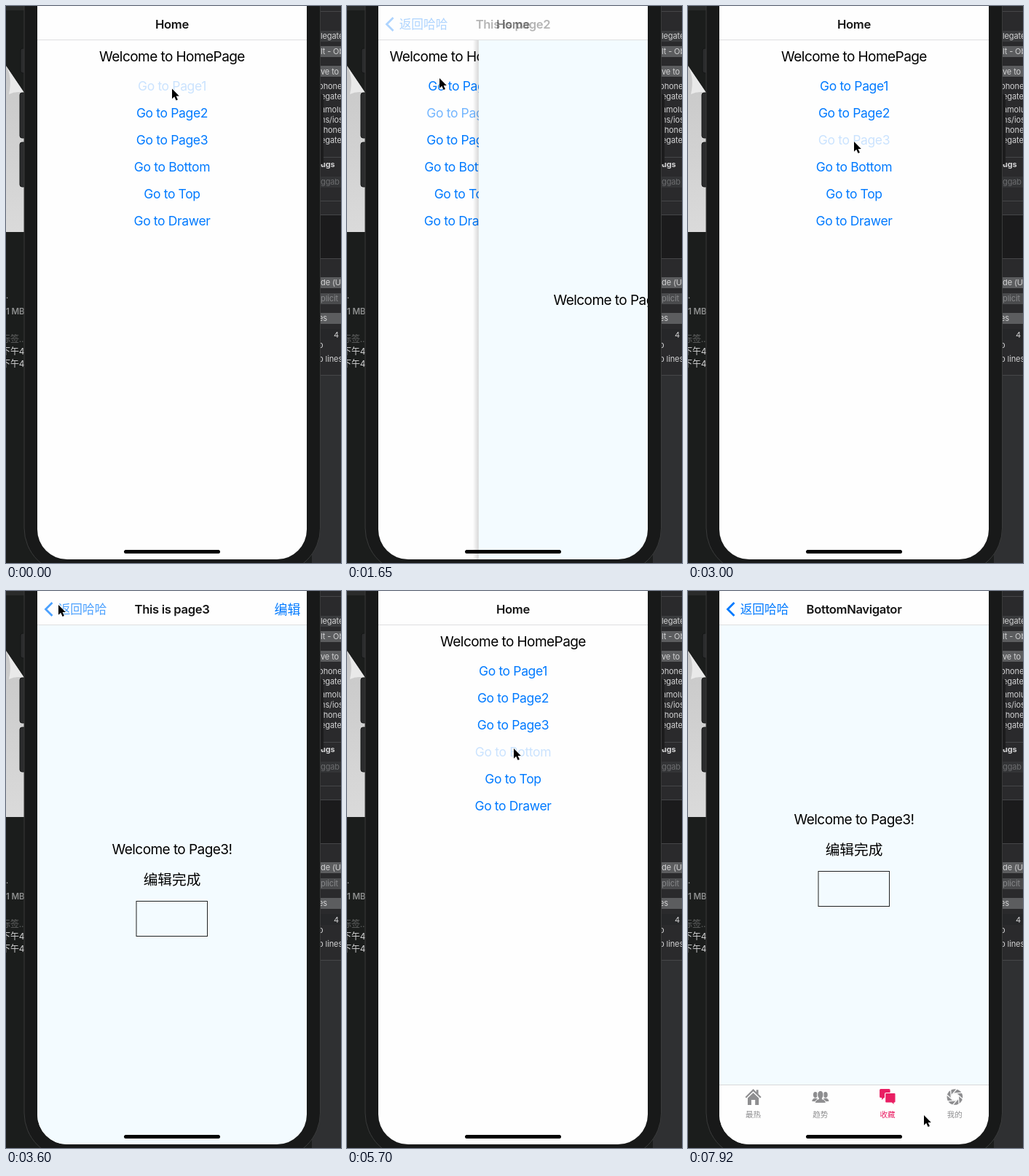
An HTML page that plays this animation: 460x764 px, repeating every 8000 ms.

```html
<!DOCTYPE html>
<html lang="en">
<head>
<meta charset="utf-8">
<title>Stack navigation demo</title>
<style>
html, body { margin: 0; width: 100%; height: 100%; overflow: hidden; background: #1b1d1c; }
svg { display: block; }
text { font-family: Inter, "Noto Sans CJK SC", "Noto Sans CJK", sans-serif; text-anchor: middle; fill: #000; }
.latin { letter-spacing: -.03em; }
.link { fill: #007aff; letter-spacing: -.02em; }
.title { font-weight: 600; fill: #151515; letter-spacing: -.02em; }
.blue { fill: #007aff; }
.side { text-anchor: start; fill: #d2d2d3; letter-spacing: -.01em; }
.tab { color: #8e8e90; }
.tab.on { color: #e91e63; }
.tab text, .tab .ink { fill: currentColor; }
</style>
</head>
<body>
<svg id="stage" width="460" height="764" viewBox="0 0 460 764"></svg>
<script>
const LOOP = 8000, MID = 228, LEFT = 43, WIDTH = 370;

const text = (x, y, size, str, cls = '', extra = '') =>
  `<text x="${x}" y="${y}" font-size="${size}" class="${cls}" ${extra}>${str}</text>`;
const rect = (x, y, w, h, fill, extra = '') =>
  `<rect x="${x}" y="${y}" width="${w}" height="${h}" fill="${fill}" ${extra}/>`;
const heading = (y, str) => text(MID, y, 19.05, str, 'latin');
const link = (y, str, extra) => text(MID, y, 17.5, str, 'link', extra);

// Desktop behind the phone
function desktop() {
  const field = (y, fill) => rect(420, y, 50, 15, fill, 'rx="3"');
  const rule = y => rect(420, y, 40, 1, '#454648');
  const label = (y, str, x = 432, fill = '#d2d2d3', weight = 400) =>
    text(x, y, 11, str, 'side', `style="fill:${fill};font-weight:${weight}"`);
  const paths = ['phone', 'egate', 'amolu', 'ns/ios', 'phone', 'egate'];
  const rows = [114, 128, 146, 160, 174, 188];
  return rect(0, 0, 460, 764, '#1b1d1c') + rect(0, 0, 25, 6, '#2a2b2b')
    + '<path d="M0 82L25 119V310H0Z" fill="url(#paper)"/>'
    + '<path d="M0 82Q9 98 4 121Q14 116 25 119Z" fill="#e9e9e9"/>'
    + text(0, 401, 11, '.', 'side') + text(0, 423, 11.5, '1 MB', 'side', 'style="fill:#8d8e8e;font-weight:600"')
    + text(-6, 461, 12, '标签...', 'side', 'style="fill:#626363"')
    + text(-6, 478, 12, '下午4', 'side') + text(-6, 495, 12, '下午4', 'side')
    + rect(420, 0, 40, 764, '#2a2a2c') + rect(420, 507, 40, 257, '#2f3032') + rule(7)
    + field(34, '#3a3b3d') + field(55, '#5c5d5f') + field(82, '#5c5d5f')
    + label(45, 'legate') + label(66, 'lt - Obj') + label(94, 've to G')
    + paths.map((str, i) => label(rows[i], str, i % 4 ? 432 : 429)).join('')
    + rule(207) + label(221, 'ugs', 432, '#d2d2d3', 700)
    + field(234, '#333436') + label(245, 'ggab', 432, '#6c6d6f') + rule(267)
    + rect(420, 286, 40, 61, '#1b1b1c') + rule(286) + rule(346)
    + field(372, '#5c5d5f') + field(394, '#4a4b4d') + field(421, '#5c5d5f') + field(443, '#262729')
    + label(383, 'de (UT') + label(405, 'plicit', 432, '#87888a') + label(432, 'es', 429)
    + label(455, '4', 450) + label(469, 'o', 429) + label(488, 'p lines', 429) + rule(506);
}

function phone() {
  const button = (x, y, w, h) => rect(x, y, w, h, '#2b2c2d', 'rx="3" stroke="#151616"');
  return button(20, 58, 10, 34) + button(19, 119, 10, 62) + button(19, 187, 10, 61)
    + rect(425, 121, 11, 96, '#1c1c1d', 'rx="2"')
    + rect(25, -100, 406.5, 878, '#181919', 'rx="62" stroke="#3a3b3b"');
}

// Page contents
const links = ['Page1', 'Page2', 'Page3', 'Bottom', 'Top', 'Drawer'];
const white = rect(LEFT, 47, WIDTH, 715, '#fefefe');
const azure = rect(LEFT, 47, WIDTH, 715, '#f3fbff');
const home = white + heading(76, 'Welcome to HomePage')
  + links.map((name, i) => link(115.5 + 37 * i, 'Go to ' + name, `id="link${i}"`)).join('');
const page1 = white + heading(76, 'Welcome to page1!') + link(115.5, 'Go Back')
  + text(MID, 152.5, 17.7, '跳转页面4', 'blue');
const page2 = azure + heading(410, 'Welcome to Page2!');
const page3 = azure + heading(361, 'Welcome to Page3!') + text(MID, 402.5, 19.7, '编辑完成')
  + rect(179, 425.5, 97.5, 48, 'none', 'stroke="#222"');

const blades = Array.from({ length: 8 }, (_, i) =>
  `<path d="M-4.6 -2.4L3.4 -11.6" stroke="#fefefe" stroke-width="1.3" transform="rotate(${45 * i})"/>`).join('');
const icons = [
  '<path class="ink" d="M0 -11L4.2 -6.8V-9.8H7V-4L11 0L9.6 1.5L0 -7.8L-9.6 1.5L-11 0Z"/>'
    + '<path class="ink" d="M0 -5.8L7.6 1.6V11H2.6V4H-2.6V11H-7.6V1.6Z"/>',
  [-7, 7].map(x => `<ellipse class="ink" cx="${x}" cy="-3" rx="2.9" ry="4"/>
    <path class="ink" d="M${x - 4.5} 6Q${x - 4.5} 2.5 ${x} 1.6Q${x + 4.5} 2.5 ${x + 4.5} 6Z"/>`).join('')
    + '<g stroke="#fefefe"><ellipse class="ink" cy="-3" rx="4.2" ry="5.6"/><path class="ink" d="M-7.4 8.4Q-7.4 4 -2 2.6H2Q7.4 4 7.4 8.4Z"/></g>'
    + '<path class="ink" d="M-2 0H2V4H-2Z"/>',
  '<path class="ink" d="M-9.5 -11H2Q3.5 -11 3.5 -9.5V1H-5L-8 4V1H-9.5Q-11 1 -11 -0.5V-9.5Q-11 -11 -9.5 -11Z"/>'
    + '<path class="ink" stroke="#fefefe" stroke-width="1.2" d="M-2 -5.5H9.5Q11 -5.5 11 -4V6.5Q11 8 9.5 8H9V11.4L5.6 8H-2Q-3.5 8 -3.5 6.5V-4Q-3.5 -5.5 -2 -5.5Z"/>',
  '<circle class="ink" r="10.8"/><circle r="5" fill="#fefefe"/>' + blades,
];
const tabs = ['最热', '趋势', '收藏', '我的'].map((name, i) =>
  `<g class="tab" transform="translate(${89.6 + 92.25 * i} 694)">${icons[i]}${text(0, 28, 10.5, name)}</g>`).join('');
const tabbed = [page1, page2, page3].map((body, i) =>
  `<g class="body"><g transform="translate(0 ${i ? -41 : 0})">${body}</g></g>`).join('')
  + rect(LEFT, 677, WIDTH, 90, '#fefefe') + rect(LEFT, 677, WIDTH, 1, '#d8d8d9') + tabs;

const pages = [
  { title: 'This is page1', body: page1 },
  { title: 'This is page2', body: page2 },
  { title: 'This is page3', body: page3, edit: true },
  { title: 'BottomNavigator', body: tabbed },
];
const header = ({ title, edit }) => '<g class="header"><g class="back">'
  + '<path d="M63.5 16L54.5 25L63.5 34" fill="none" stroke="#007aff" stroke-width="2.8"/>'
  + text(105, 31, 16.7, '返回哈哈', 'blue') + '</g>' + text(MID, 31, 16.6, title, 'title')
  + (edit ? text(386.5, 31.5, 17.9, '编辑', 'blue') : '') + '</g>';

const stage = document.getElementById('stage');
stage.innerHTML = `<defs>
  <linearGradient id="paper" x2="0" y2="1"><stop stop-color="#c8c8c8"/><stop offset="1" stop-color="#dadada"/></linearGradient>
  <linearGradient id="shade"><stop stop-color="#000" stop-opacity="0"/><stop offset="1" stop-color="#000" stop-opacity=".25"/></linearGradient>
  <clipPath id="screen">${rect(LEFT, -100, WIDTH, 859, '#fff', 'rx="41"')}</clipPath></defs>`
  + desktop() + phone()
  + `<g clip-path="url(#screen)"><g id="home">${home}</g>`
  + pages.map(p => `<g class="page">${rect(LEFT - 8, 47, 8, 715, 'url(#shade)', 'class="shade"')}${p.body}</g>`).join('')
  + rect(LEFT, 0, WIDTH, 46, '#fefefe') + rect(LEFT, 46, WIDTH, 1, '#dfdfe0')
  + pages.map(header).join('') + text(MID, 31, 16.6, 'Home', 'title', 'id="homeTitle"') + '</g>'
  + rect(162, 746, 132, 5, '#000', 'rx="2.5"')
  + '<path id="cursor" d="M0 0V13.8L3.2 10.8L5.6 16L7.9 15L5.6 10H9.8Z" stroke="#fff" stroke-width="1" paint-order="stroke"/>';

// Motion
const trips = [
  { push: 60, pop: 790, backDown: 640 },
  { push: 1533.5, pop: 2283.5, backDown: 2130 },
  { push: 3080, pop: 3700, backDown: 3535 },
  { push: 5740, pop: Infinity, backDown: Infinity },
];
const cursorPath = [
  [0, 228, 113.5], [150, 128, 62], [300, 76, 23], [450, 72, 20], [750, 71, 20],
  [900, 168, 128], [1050, 217, 150], [1200, 226, 148], [1500, 228, 151],
  [1650, 127, 99], [1800, 76, 24], [2250, 71, 20], [2400, 193.5, 235.5],
  [2550, 220, 214], [2850, 228, 187], [3000, 228, 186], [3150, 180, 140],
  [3300, 98, 42], [3450, 74, 21], [3600, 72, 19], [3750, 74, 22],
  [3900, 130, 110], [4200, 178, 192], [4650, 221, 272], [4950, 222, 266],
  [5400, 229, 219], [5700, 229, 216], [5850, 226, 240], [6000, 205, 470],
  [6150, 178, 650], [6300, 163, 712], [6590, 162, 724], [7040, 178, 718],
  [7180, 180, 718], [7480, 266, 718], [7770, 272, 718], [7920, 324, 719],
];
const lateSteps = [6590, 6740, 6890, 7040, 7180, 7330, 7480, 7630, 7770, 7920];

// The screen refreshes about every 150 ms.
const stepTime = t => t < 6590 ? Math.min(6450, Math.floor(t / 150) * 150)
  : lateSteps.filter(s => s <= t).pop();

const clamp = v => Math.max(0, Math.min(1, v));
const ease = v => v < .5 ? 2 * v * v : 1 - 2 * (1 - v) ** 2;
// Critically damped
function spring(ms) {
  const x = Math.max(0, ms) * .01826;
  return 1 - (1 + x) * Math.exp(-x);
}
function pressAlpha(t, down, up) {
  if (t <= down) return 1;
  return t < up ? 1 - .8 * ease(clamp((t - down) / 150)) : .2 + .8 * ease(clamp((t - up) / 250));
}
function cursorAt(t) {
  const i = cursorPath.findIndex(k => k[0] > t);
  if (i < 0) return cursorPath[cursorPath.length - 1].slice(1);
  const [t0, x0, y0] = cursorPath[i - 1], [t1, x1, y1] = cursorPath[i];
  const f = (t - t0) / (t1 - t0);
  return [x0 + (x1 - x0) * f, y0 + (y1 - y0) * f];
}

const all = sel => [...stage.querySelectorAll(sel)];
const byId = id => document.getElementById(id);
const pageEls = all('.page'), shadeEls = all('.shade'), headerEls = all('.header'), backEls = all('.back');
const bodyEls = all('.body'), tabEls = all('.tab');
const move = (el, x, y = 0) => el.setAttribute('transform', `translate(${x.toFixed(2)} ${y.toFixed(2)})`);

function render(t) {
  let open = 0;
  trips.forEach(({ push, pop, backDown }, i) => {
    let p = spring(t - push) - spring(t - pop);
    if (p < .003) p = 0;
    if (p > .997) p = 1;
    open = Math.max(open, p);
    pageEls[i].style.display = p ? '' : 'none';
    move(pageEls[i], WIDTH * (1 - p));
    shadeEls[i].style.opacity = p;
    headerEls[i].style.opacity = p ** 2.5;
    backEls[i].style.opacity = pressAlpha(t, backDown, pop);
    byId('link' + i).style.opacity = pressAlpha(t, push - 250, push);
  });
  move(byId('home'), -.3 * WIDTH * open);
  byId('homeTitle').style.opacity = (1 - open) ** .7;

  const tab = t < 7180 ? 0 : t < 7770 ? 1 : 2;
  bodyEls.forEach((el, i) => el.style.display = i === tab ? '' : 'none');
  tabEls.forEach((el, i) => el.classList.toggle('on', i === tab));
  move(byId('cursor'), ...cursorAt(t));
}

const start = performance.now();
function tick() {
  render(stepTime((performance.now() - start) % LOOP));
  requestAnimationFrame(tick);
}
tick();
</script>
</body>
</html>
```
